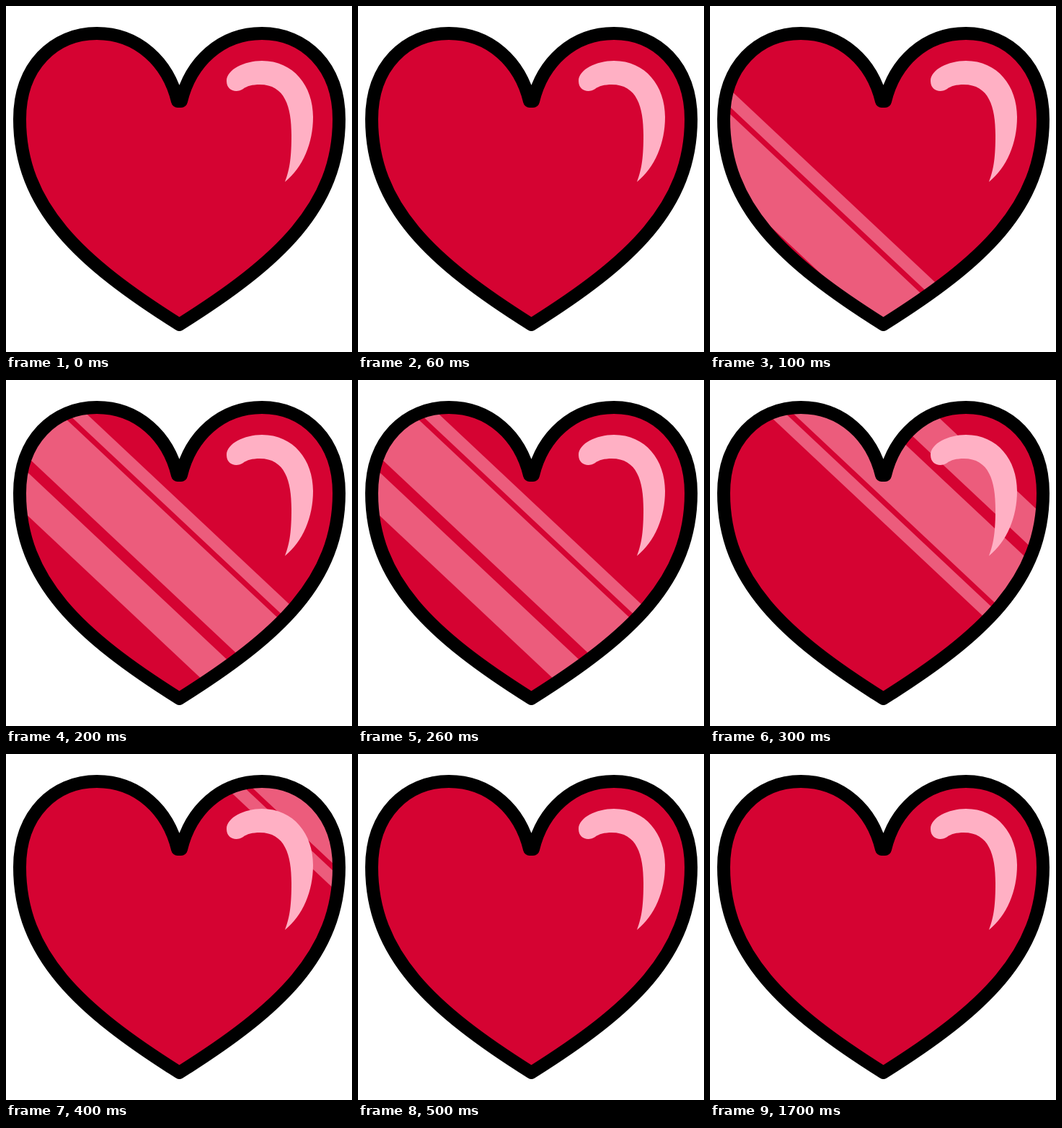
An HTML page that plays this animation: 480x480 px, repeating every 2500 ms.

```html
<!DOCTYPE html>
<html lang="en">
<head>
<meta charset="utf-8">
<title>Shining heart</title>
<style>
  html, body { margin: 0; width: 100%; height: 100%; overflow: hidden; background: #fff; }
  svg { display: block; width: 100%; height: 100%; }
</style>
</head>
<body>
<svg viewBox="0 0 480 480">
  <defs>
    <path id="heart" d="M238 132 C225 78 183 38 126 38 C67 38 19 83 19 157
      C19 278 102 355 240.5 442 C379 355 462 278 462 157
      C462 83 414 38 355 38 C298 38 256 78 243 132 Z"/>
    <clipPath id="inside"><use href="#heart"/></clipPath>
  </defs>
  <use href="#heart" fill="#d50332"/>
  <g clip-path="url(#inside)">
    <g id="shine" fill="#ec5c7c" visibility="hidden">
      <rect width="480" height="24"/>
      <rect width="480" height="103" y="34"/>
      <rect width="480" height="60" y="158"/>
    </g>
  </g>
  <path fill="#ffb0c4" d="M306 104 C306 88 331 76 355 76 C399 76 426 111 426 154
    C426 190 412 224 387 244 C394 226 396 208 396 179 C396 140 387 109 352 109
    C342 109 334 111 329 115 C320 121 306 118 306 104 Z"/>
  <use href="#heart" fill="none" stroke="#000" stroke-width="18" stroke-linejoin="round"/>
</svg>
<script>
  const LOOP = 2500, STEP = 100;
  const shine = document.getElementById('shine');

  // Where the thin stripe's outer edge meets x = 0, and which way the wider bands follow it.
  const poses = [
    null,
    { edge: 90, side: 1 },
    { edge: -58, side: 1 },
    { edge: -28, side: -1 },
    { edge: -240, side: -1 },
  ];

  function draw(now) {
    const pose = poses[Math.floor((now % LOOP) / STEP)];
    shine.setAttribute('visibility', pose ? 'visible' : 'hidden');
    if (pose) {
      shine.setAttribute('transform', `skewY(43.2) translate(0 ${pose.edge}) scale(1 ${pose.side})`);
    }
  }

  const start = performance.now();
  function tick() {
    draw(performance.now() - start);
    requestAnimationFrame(tick);
  }
  tick();
</script>
</body>
</html>
```
